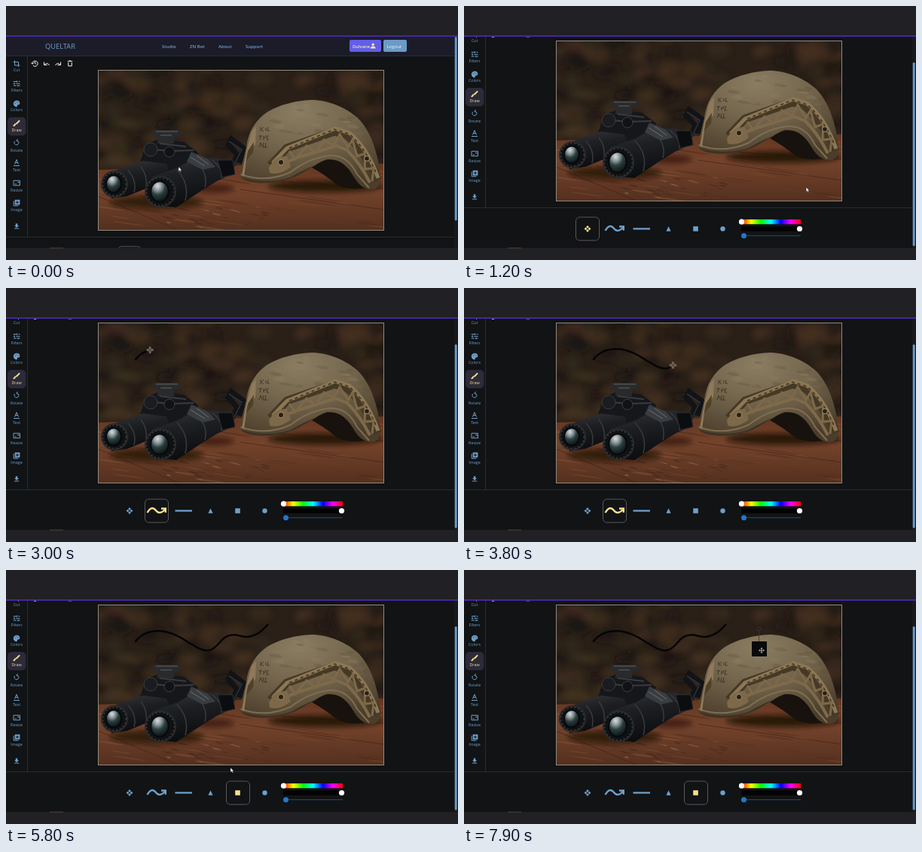
An HTML page for the animation above (8000 ms loop, 600x338 px).

```html
<!DOCTYPE html>
<html lang="en">
<head>
<meta charset="utf-8">
<title>Image editor</title>
<style>
  html, body { margin: 0; width: 100%; height: 100%; overflow: hidden; background: #212025; }
  svg { display: block; width: 100vw; height: 100vh; }
  text { font-family: "Open Sans", "Noto Sans", sans-serif; }
  .side text { font-size: 5.4px; text-anchor: middle; fill: #6f9fc9; }
  .nav text { font-size: 6px; font-weight: 600; fill: #6f9fc9; }
  .line { fill: none; stroke: #6f9fc9; stroke-width: 1; }
  .white { fill: none; stroke: #f2f2f2; stroke-width: 1; }
  .tool { --c: #6f9fc9; fill: var(--c); }
  .tool.sel { --c: #f6df8c; }
  .tool path.s { fill: none; stroke: var(--c); }
  .cur { display: none; }
</style>
</head>
<body>
<svg viewBox="0 0 600 338" preserveAspectRatio="none">
  <defs>
    <clipPath id="view"><rect x="0" y="41" width="600" height="281"/></clipPath>
    <clipPath id="crop"><rect x="122" y="46" width="380" height="214"/></clipPath>
    <clipPath id="wood"><use href="#top"/></clipPath>
    <clipPath id="dome"><use href="#shell"/></clipPath>
    <filter id="b1" x="-20%" y="-20%" width="140%" height="140%"><feGaussianBlur stdDeviation="0.6"/></filter>
    <filter id="b3" x="-40%" y="-40%" width="180%" height="180%"><feGaussianBlur stdDeviation="3"/></filter>
    <filter id="b5"><feGaussianBlur stdDeviation="4.5"/></filter>
    <linearGradient id="table" x2="0" y2="1">
      <stop offset="0" stop-color="#663620"/><stop offset=".4" stop-color="#74432b"/>
      <stop offset="1" stop-color="#54301f"/>
    </linearGradient>
    <radialGradient id="tan" cx=".42" cy=".15" r=".85">
      <stop offset="0" stop-color="#8b7d62"/><stop offset=".45" stop-color="#74664d"/>
      <stop offset="1" stop-color="#4a3d2b"/>
    </radialGradient>
    <linearGradient id="tube" x2="0.3" y2="1">
      <stop offset="0" stop-color="#34363a"/><stop offset=".4" stop-color="#1d1f22"/>
      <stop offset="1" stop-color="#0b0c0e"/>
    </linearGradient>
    <radialGradient id="glass" cx=".38" cy=".22" r=".8">
      <stop offset="0" stop-color="#d9dde0"/><stop offset=".28" stop-color="#8d989c"/>
      <stop offset=".55" stop-color="#2a3f3e"/><stop offset="1" stop-color="#0d1012"/>
    </radialGradient>
    <linearGradient id="hue">
      <stop offset="0" stop-color="#f00"/><stop offset=".167" stop-color="#ff0"/>
      <stop offset=".333" stop-color="#0f0"/><stop offset=".5" stop-color="#0ff"/>
      <stop offset=".667" stop-color="#00f"/><stop offset=".833" stop-color="#f0f"/>
      <stop offset="1" stop-color="#f00"/>
    </linearGradient>
    <path id="top" d="M122 179L310 173L502 171V260H122Z"/>
    <path id="shell" d="M312 189C309 181 317 162 319 148C322 127 332 112 347 102C363 92 385 87 405 86C428 86 451 96 467 110C484 127 494 157 497 186C498 198 494 205 484 205C473 204 468 198 462 189C454 174 443 164 427 165C411 169 398 184 374 192C352 199 320 198 312 189Z"/>
  </defs>

  <rect width="600" height="338" fill="#212025"/>
  <rect y="40" width="600" height="282" fill="#111315"/>

  <g clip-path="url(#view)">
    <g id="page">
      <g class="nav">
        <rect y="41" width="595" height="25.5" fill="#1c1c29"/>
        <path d="M0 66.5H595" stroke="#272a37"/>
        <text x="52" y="57" style="font-size:9.3px;font-weight:400">QUELTAR</text>
        <text x="207" y="56">Studio</text>
        <text x="244" y="56">ZN Bot</text>
        <text x="282" y="56">About</text>
        <text x="318" y="56">Support</text>
        <rect x="456" y="45" width="42" height="16" rx="2" fill="#625ee9"/>
        <rect x="501" y="45" width="31" height="16" rx="2" fill="#6b9bc6"/>
        <g id="user" style="fill:#fff">
          <text x="460" y="55.5" style="font-size:5.8px;fill:inherit">Dulvane</text>
          <circle cx="487.2" cy="51.2" r="1.7"/><path d="M483.8 56.5q0-3 3.4-3t3.4 3z"/>
        </g>
        <text x="505.5" y="55.5" style="fill:#f4f7fa;font-weight:400">Logout</text>
      </g>

      <g class="white">
        <path d="M35 77a3.6 3.6 0 1 1 1 2.2M33.5 75.5l1.5 1.8l1.8-1.6M38.4 74v2.4l1.7 1"/>
        <path d="M51 78.5Q54.5 74 57.5 79M50.5 74.5v4h4"/>
        <path d="M72 78.5Q68.5 74 65.5 79M72.5 74.5v4h-4"/>
        <path d="M82.7 75v4.8h4.6V75M81.8 73.6h6.4M84 72.8h2"/>
      </g>

      <path d="M28.5 66V307M0 307.5H595" stroke="#262d33" fill="none"/>
      <g class="side" id="side">
        <rect x="2" y="148" width="24.5" height="24.5" rx="5" fill="#2d2a3a"/>
        <g class="line">
          <path d="M11.5 72.5V79H18.5M9.5 74.5H16.5V81"/>
          <path d="M9.8 100.5h5m2 0h1.8M9.8 103.3h1.5m2 0h5.3M9.8 106h4m2 0h2.8M14.8 99.3v2.4M11.3 102v2.5M15.8 104.8v2.4"/>
          <path d="M11.7 179.8a3 3 0 1 0 2.5-1M15.8 177l-2 1.8l2 1.8"/>
          <path d="M11.5 210.5l2.5-6l2.5 6M12.4 208.5h3.2M10 212.5h8"/>
          <path d="M10 232.3h8.5v6.4H10zM11.8 236.8h2M15 234.3h2v1.5"/>
          <path d="M10.2 259.5v6.3h6.2"/>
        </g>
        <g fill="#6f9fc9">
          <path d="M11.7 257.8h6.7v6.7h-6.7z"/>
          <path d="M14 125.8a4.2 4.2 0 0 0 0 8.4q1.5 0 .8-1.6q0-1.2 1.4-1.2q2.2 0 2.2-2a4 4 0 0 0-4.4-3.6z"/>
          <path d="M12.8 289.4h2.5v2.6h1.8l-3 2.9l-3-2.9h1.7zM11 295.6h6.2v1H11z"/>
        </g>
        <path d="M11.8 129.3h.8m1-1.5h.8m1.3 1h.8M15 259.2v4M13 261.2h4" stroke="#111315"/>
        <path d="M14 156.5l3.6-3.6M10.4 159.2q1.5-.3 1.7-2" fill="none" stroke="#f6df8c" stroke-width="2" stroke-linecap="round"/>
      </g>

      <!-- canvas image -->
      <g transform="translate(0 39)">
        <g clip-path="url(#crop)">
          <rect x="122" y="46" width="380" height="214" fill="#2a2018"/>
          <g id="forest" filter="url(#b5)"></g>
          <g filter="url(#b1)">
            <use href="#top" fill="url(#table)"/>
            <g id="grain" clip-path="url(#wood)"></g>
            <path d="M122 214L230 260M310 205L502 232M330 192L502 204" stroke="#3c1f13" opacity=".6" fill="none"/>
          </g>
          <g fill="#170d08" filter="url(#b3)">
            <ellipse cx="424" cy="201" rx="76" ry="8" opacity=".8"/>
            <ellipse cx="200" cy="222" rx="62" ry="9" opacity=".7"/>
            <ellipse cx="275" cy="204" rx="28" ry="6" opacity=".5"/>
          </g>

          <!-- helmet -->
          <g filter="url(#b1)">
            <path d="M406 176C440 153 459 172 478 203Q450 207 437 197Q424 186 406 176Z" fill="#17120d"/>
            <use href="#shell" fill="url(#tan)"/>
            <g clip-path="url(#dome)">
              <g id="wear"></g>
              <path d="M311 185Q345 197 378 182Q402 163 430 160Q454 159 466 185L482 203" fill="none" stroke="#7f6d50" stroke-width="2"/>
              <path d="M312 191Q345 201 378 191Q402 177 430 167" fill="none" stroke="#3d3223" stroke-width="4"/>
            </g>
            <path d="M351 173L373 150L436 128L452 133Q473 149 494 193" fill="none" stroke="#453926" stroke-width="11"/>
            <path d="M354 170L373 150L437 124L456 130Q480 150 494 190" fill="none" stroke="#8c7755" stroke-width="5"/>
            <path d="M354 177L386 163L438 147L453 153Q470 170 483 196" fill="none" stroke="#7e6a4b" stroke-width="4"/>
            <path d="M376 154L384 165L399 147L411 156L422 139L435 146L443 132L454 149L460 139L466 161L477 157L476 178L488 177L486 194" fill="none" stroke="#7d6948" stroke-width="3"/>
            <path d="M376 150L436 125L455 131Q477 149 492 185" fill="none" stroke="#40341f" stroke-width="1.6" stroke-dasharray="4 4"/>
            <path d="M349 176Q357 160 373 161L378 175Q363 187 350 183Z" fill="#7d6949"/>
            <g fill="#262019" stroke="#94805d" stroke-width="1.2">
              <circle cx="365" cy="169" r="3.6"/><circle cx="479" cy="164" r="3.4"/>
            </g>
            <path d="M313 186L319 154L326 128L332 121L331 145L320 158L316 188Z" fill="#8e7a5a"/>
            <path d="M321 154l8-12l-1 14l-9 11z" fill="#4f4029"/>
          </g>
          <path d="M338 122v6m4-6l-3 3l3 3m3-5v4m3-5l-1 5h3M335 134h5m-2 0l-1 5m5-5v5m0-3h3v-3m3 0l-2 6h3M336 149l2-6l2 5m2-5l-1 6h3m1-6l-1 6h3" fill="none" stroke="#332c24" stroke-width=".8"/>

          <!-- twin scope -->
          <g filter="url(#b1)" fill="none">
            <path d="M297 180L307 159L295 146L299 138L315 150L310 170" stroke="#111317" stroke-width="7"/>
            <path d="M296 141L313 152L302 174" stroke="#303238" stroke-width="1.5"/>
            <path d="M178 168L186 145L203 138L236 142L255 156L250 176L214 184Z" fill="#15171a"/>
            <path d="M195 126H231L233 132L223 136V144H201V135L194 133Z" fill="#292a2c"/>
            <path d="M199 128H228M205 133H220" stroke="#60625f"/>
            <path d="M184 151L218 154L249 153M204 144L239 148" stroke="#393b3f" stroke-width="2"/>
            <circle cx="192" cy="152" r="9" fill="#1b1c1f" stroke="#3a3c40"/>
            <circle cx="217" cy="155" r="7" fill="#101215" stroke="#3c3f43"/>
            <path d="M136 183Q160 174 182 167L213 171L220 190L161 214L140 217Z" fill="url(#tube)"/>
            <path d="M162 180q12 13 8 29m9-34q9 11 7 27" stroke="#383b3f" stroke-width="1.5"/>
            <path d="M194 188L228 176L249 164L282 163L301 171L302 184L280 194L259 207L226 229L199 226Z" fill="url(#tube)"/>
            <path d="M227 179q17 18 11 41m14-52q17 15 12 34m10-36q14 12 12 24" stroke="#36393e" stroke-width="1.6"/>
            <path d="M240 168L246 155L267 164L278 175L261 179Z" fill="#393c40"/>
            <path d="M245 162L264 174M253 160L269 172" stroke="#6e706f"/>
            <path d="M281 166L301 166L304 185L287 189Z" fill="#0c0d10" stroke="#2b2e34"/>
            <g id="lenses"></g>
          </g>
        </g>
        <path id="stroke" d="M172 95C178 87 188 81 203 81C226 82 240 97 258 105C270 111 277 104 284 96C291 87 300 84 312 88C325 92 338 84 347 73" fill="none" stroke="#050505" stroke-width="2.4" stroke-linecap="round"/>
        <g id="box">
          <rect width="20" height="20" fill="#08090a"/>
          <rect id="edge" width="20" height="20" fill="none" stroke="#69655c" stroke-width=".6" stroke-dasharray="2 1"/>
          <g id="grips" fill="#24231f" stroke="#8f8c82" stroke-width=".5"></g>
          <path id="spin" d="M7.5-18.5h4v4h-4zM9.5-14.5V0" fill="none" stroke="#3b372d" stroke-width=".8"/>
        </g>
        <rect x="122.5" y="46.5" width="379" height="213" fill="none" stroke="#8f897f"/>

        <!-- tool strip -->
        <rect id="pick" y="281" width="31" height="31" rx="5" stroke="#57565d"/>
        <g class="tool"><path d="M164 292l1.9 2l-1.9 2l-1.9-2zM164 297l1.9 2l-1.9 2l-1.9-2zM161.5 294.5l1.9 2l-1.9 2l-1.9-2zM166.5 294.5l1.9 2l-1.9 2l-1.9-2z"/></g>
        <g class="tool"><path class="s" d="M187.5 299C192 291 196 292 199 296S206 300 211 295M206 293.5h5.8v5.2" stroke-width="2.4"/></g>
        <g class="tool"><rect x="224.5" y="295.3" width="22.5" height="2.3"/></g>
        <g class="tool"><path d="M271.5 293.3L274.6 299.7H268.4Z"/></g>
        <g class="tool"><rect x="304.2" y="293.2" width="6.6" height="6.6"/></g>
        <g class="tool"><circle cx="343.5" cy="296.5" r="3.2"/></g>
        <rect x="368" y="284" width="79" height="6.3" fill="url(#hue)"/>
        <rect x="368" y="293.4" width="79" height="6.3" fill="#030303"/>
        <path d="M372 305.7H447" stroke="#1f4c77"/>
        <circle cx="371.5" cy="305.8" r="3.5" fill="#2377cb"/>
        <circle cx="368.5" cy="287.2" r="3.6" fill="#fff"/>
        <circle cx="445.5" cy="296.5" r="3.6" fill="#fff"/>
      </g>
    </g>
    <rect x="595" y="41" width="5" height="281" fill="#17191c"/>
    <rect id="thumb" x="595.7" width="3" height="244.5" rx="1.5" fill="#679aca"/>
  </g>

  <rect y="39" width="600" height="2" fill="#41289a"/>
  <rect x="58" y="321.5" width="18" height="1.2" fill="#45413a"/>

  <g id="cursor">
    <path class="cur" d="M0 0V6L1.5 4.8L2.5 7L3.5 6.5L2.6 4.4H4.4Z" fill="#fff" stroke="#111" stroke-width=".4"/>
    <path class="cur" d="M-.6 0q.9-1 1.5 0v2.5l3 .7v3l-1 1.5H0L-2 4.3l.6-.6l.8.6z" fill="#fff" stroke="#222" stroke-width=".5"/>
    <path class="cur" d="M-.9-4h1.8v3.1H4v1.8H.9V4H-.9V.9H-4V-.9h3.1z" fill="#3a352e" stroke="#a5a097" stroke-width=".7"/>
    <path class="cur" d="M0-4l1.6 1.8H.5V-.5h1.7v-1.1L4 0L2.2 1.6V.5H.5v1.7h1.1L0 4l-1.6-1.8h1.1V.5h-1.7v1.1L-4 0l1.8-1.6v1.1h1.7v-1.7h-1.1z" fill="#fff" stroke="#111" stroke-width=".4"/>
  </g>
</svg>
<script>
const $ = id => document.getElementById(id);
const NS = 'http://www.w3.org/2000/svg';
const add = (parent, tag, attrs) => {
  const el = document.createElementNS(NS, tag);
  for (const k in attrs) el.setAttribute(k, attrs[k]);
  return parent.appendChild(el);
};

let seed = 17;
const rnd = (a = 0, b = 1) => {
  seed = (seed * 16807) % 2147483647;
  return a + (b - a) * seed / 2147483647;
};

function specks(parent, n, [x0, x1, y0, y1], [rx, ry], colors, opacity, tilt = 0) {
  for (let i = 0; i < n; i++) {
    const x = rnd(x0, x1), y = rnd(y0, y1);
    add(parent, 'ellipse', {
      cx: x, cy: y, rx: rnd(rx / 3, rx), ry: rnd(ry / 3, ry),
      fill: colors[Math.floor(rnd(0, colors.length))], opacity,
      transform: `rotate(${tilt} ${x} ${y})`
    });
  }
}

specks($('forest'), 150, [115, 510, 40, 180], [19, 11], ['#45301f', '#15110e', '#2f291b', '#4a3322', '#1d1712', '#3a2a1d'], .65);
specks($('forest'), 18, [125, 260, 115, 172], [16, 8], ['#38331f', '#433421'], .6);
specks($('grain'), 70, [122, 502, 180, 258], [26, 1.4], ['#875033', '#4a2818', '#8f5a3d', '#5b3220'], .4, 8);
specks($('grain'), 22, [210, 350, 228, 256], [8, 1.2], ['#977662', '#3f2418'], .5, 14);
specks($('wear'), 34, [335, 480, 90, 135], [10, 3], ['#8f8063', '#5c4f3a', '#7f7158'], .3, 8);

function lens(cx, cy, r) {
  const g = $('lenses');
  add(g, 'circle', { cx, cy, r, fill: '#0f1113', stroke: '#282a2e', 'stroke-width': 2 });
  add(g, 'circle', { cx, cy, r: r - 1.5, stroke: '#333539', 'stroke-width': 2, 'stroke-dasharray': '2 3' });
  add(g, 'ellipse', { cx: cx - 1, cy, rx: r * .58, ry: r * .68, fill: 'url(#glass)', stroke: '#050608', 'stroke-width': 1.5 });
}
lens(144, 198, 17);
lens(205, 208, 20);

['Cut', 'Filters', 'Colors', 'Draw', 'Rotate', 'Text', 'Resize', 'Image'].forEach((name, i) => {
  const label = add($('side'), 'text', { x: 14, y: 87.3 + i * 26.55 });
  label.textContent = name;
  if (name === 'Draw') label.style.fill = '#f6df8c';
});

for (const x of [0, 10, 20]) for (const y of [0, 10, 20])
  if (x !== 10 || y !== 10) add($('grips'), 'rect', { x: x - 1.7, y: y - 1.7, width: 3.4, height: 3.4 });

// Rows are [time, ...values]; values between rows are interpolated.
const smooth = k => k * k * (3 - 2 * k);
function track(rows, t, ease = k => k) {
  if (t <= rows[0][0]) return rows[0].slice(1);
  for (let i = 1; i < rows.length; i++) {
    const a = rows[i - 1], b = rows[i];
    if (t <= b[0]) {
      const k = ease((t - a[0]) / (b[0] - a[0]));
      return a.slice(1).map((v, j) => v + (b[j + 1] - v) * k);
    }
  }
  return rows[rows.length - 1].slice(1);
}
const at = (rows, t) => rows.filter(r => r[0] <= t).pop()[1];

const ARROW = 0, HAND = 1, CROSS = 2, MOVE = 3;
const scroll = [[600, 0], [700, 6], [800, 24], [900, 39]];
const moves = [
  [0, 229, 214], [100, 235, 214], [600, 541, 223], [1000, 541, 223], [1600, 206, 293],
  [2300, 206, 293], [2700, 172, 95], [4400, 347, 73], [4600, 347, 76], [5100, 307, 295],
  [5500, 307, 295], [5800, 298, 263], [6500, 341, 178], [6700, 341, 178], [7000, 361, 198],
  [7200, 362, 185], [7300, 354, 190], [7400, 354, 190], [7900, 395, 107]
];
const kinds = [[0, ARROW], [1500, HAND], [2400, CROSS], [4800, ARROW], [5000, HAND], [5600, ARROW], [6000, CROSS], [7300, MOVE]];
const picks = [[0, 0], [1700, 1], [5200, 4]];
const pickX = [148.5, 184.5, 220.5, 256.5, 292.5];
const pen = [[2800, 0], [3800, .59], [4400, 1]];

const line = $('stroke'), len = line.getTotalLength();
const tools = document.querySelectorAll('.tool'), cursors = document.querySelectorAll('.cur');
const show = (el, on) => { el.style.display = on ? 'inline' : 'none'; };

function draw(t) {
  const [s] = track(scroll, t);
  $('page').setAttribute('transform', `translate(0 ${-s})`);
  $('thumb').setAttribute('y', 41 + s * 34 / 39);
  $('user').style.fill = t < 300 ? '#f8e9a4' : '#fff';

  const pick = at(picks, t);
  tools.forEach((el, i) => el.classList.toggle('sel', i === pick));
  $('pick').setAttribute('x', pickX[pick]);
  const hover = (t >= 1700 && t < 2400) || (t >= 5200 && t < 5600);
  $('pick').setAttribute('fill', hover ? '#302c3d' : '#111315');

  const inked = track(pen, t - 50)[0] * len;
  show(line, inked > 0);
  line.setAttribute('stroke-dasharray', `${inked} ${len + 9}`);

  let [x, y] = track(moves, t, smooth);
  if (t >= 2800 && t <= 4400) ({ x, y } = line.getPointAtLength(track(pen, t)[0] * len));
  $('cursor').setAttribute('transform', `translate(${x} ${y})`);
  const kind = at(kinds, t);
  cursors.forEach((el, i) => show(el, i === kind));

  const size = track([[6700, 0], [7000, 1]], t, smooth)[0];
  const dragging = t >= 7400;
  const bx = dragging ? x - 13 : 341, by = dragging ? y - 12 : 178;
  show($('box'), size > 0);
  $('box').setAttribute('transform', `translate(${bx} ${by}) scale(${size})`);
  show($('grips'), t >= 7000 && !dragging);
  show($('edge'), !dragging);
  show($('spin'), dragging);
}

function tick() {
  draw(Math.floor(performance.now() % 8000 / 100) * 100);
  requestAnimationFrame(tick);
}
tick();
</script>
</body>
</html>
```
